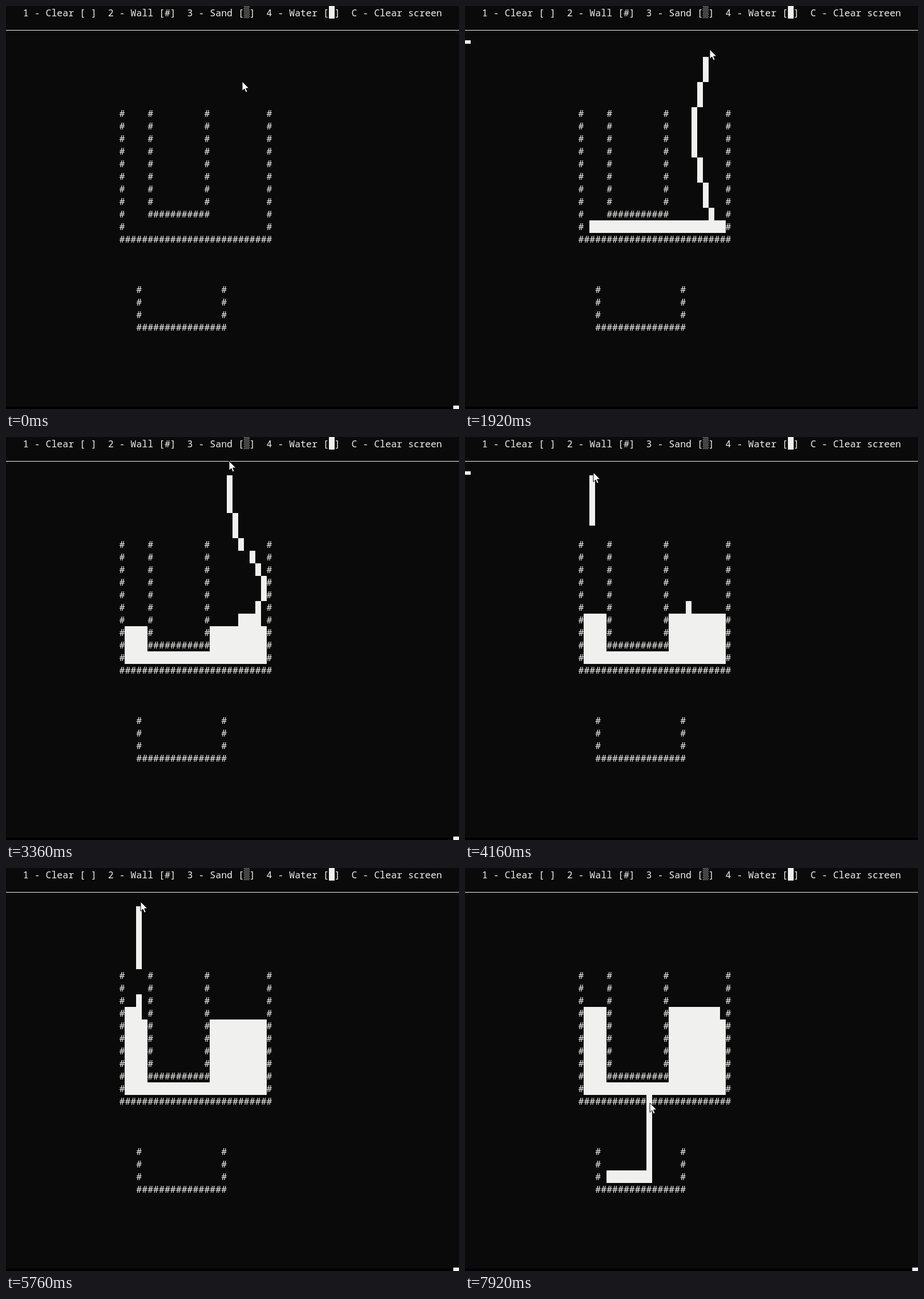
Write an HTML page with a canvas that moves like this. It is 794 by 705 pixels and loops after 8000 ms.

```html
<!DOCTYPE html>
<html lang="en">
<head>
<meta charset="utf-8">
<title>Falling water</title>
<style>
html, body { margin: 0; width: 100%; height: 100%; overflow: hidden; background: #0a0a0a; }
canvas { display: block; }
</style>
</head>
<body>
<canvas id="stage" width="794" height="705"></canvas>
<script>
const ctx = document.getElementById('stage').getContext('2d');
const LOOP = 8000, STEP = 80, TICK = 47;
const CW = 794 / 80, CH = 22;
const INK = '#f0f0ef', PAPER = '#0a0a0a';
const HOLE_COL = 32, HOLE_ROW = 18, HOLE_TICK = 155;
const HEADER = '   1 - Clear [ ]  2 - Wall [#]  3 - Sand [ ]  4 - Water [ ]  C - Clear screen';

// Turning points of the swaying hand: tick and position
const SWAY = [
  [0, 414], [8, 403], [10, 431], [11.5, 431], [19, 384], [23, 456], [34.5, 401],
  [43.5, 436], [51, 400], [63, 449.5], [68, 398], [71.5, 391], [85, 226],
  [98.5, 222], [104.5, 250.5], [109, 236.5], [131, 236], [139.5, 220], [154, 324]
];
const LIFT = [
  [0, 132], [8, 126], [11.5, 84], [43.5, 76], [71.5, 42], [74, 10], [76.5, 54],
  [85, 62], [139.5, 58], [154, 411]
];
const POURS = [[4, 71], [85, 115], [118, 140]];

// Cosine easing from one turning point to the next
function ease(keys, tick) {
  const i = keys.findIndex(k => k[0] > tick);
  if (i < 0) return keys[keys.length - 1][1];
  const [t0, a] = keys[i - 1], [t1, b] = keys[i];
  return a + (b - a) * (1 - Math.cos(Math.PI * (tick - t0) / (t1 - t0))) / 2;
}

const clamp = (v, lo, hi) => Math.min(hi, Math.max(lo, v));
const inTank = (c, r) => c > 20 && c < 46 && (r === 17 || c < 25 || c > 35);
const inTray = c => c > 23 && c < 38;

// Nearest free column in a row, trying the left side first
function freeCol(col, taken, allowed) {
  const ok = c => allowed(c) && !taken.some(w => w.col === c);
  for (let c = col; c > 20; c--) if (ok(c)) return c;
  for (let c = col; c < 46; c++) if (ok(c)) return c;
}

// Every water cell after the given number of ticks
function simulate(ticks) {
  const pool = [], tray = [];
  let drops = [], leaks = [], level = 17;
  for (let t = 0; t <= ticks; t++) {
    drops = drops.filter(d => {
      d.row++;
      if (d.row >= 8) d.col = d.col < 30 ? clamp(d.col, 21, 24) : clamp(d.col, 36, 45);
      if (d.row < level) return true;
      const taken = pool.filter(w => w.row === level);
      pool.push({ col: freeCol(d.col, taken, c => inTank(c, level)), row: level });
      if (taken.length + 1 === (level === 17 ? 25 : 14)) level--;
      return false;
    });
    leaks = leaks.filter(d => {
      if (++d.row < 24) return true;
      tray.push({ col: freeCol(d.col, tray, inTray), row: 24 });
      return false;
    });
    if (POURS.some(([a, b]) => t >= a && t <= b)) {
      const col = Math.floor(ease(SWAY, t) / CW);
      const row = Math.floor((ease(LIFT, t) - 1) / CH) + 1;
      drops.push({ col, row: Math.max(3, row) });
    }
    if (t >= HOLE_TICK) {
      pool.pop();
      leaks.push({ col: HOLE_COL, row: HOLE_ROW });
    }
  }
  return [...pool, ...tray, ...drops, ...leaks];
}

function text(str, col, row) {
  [...str].forEach((ch, i) => ctx.fillText(ch, (col + i) * CW, row * CH + 18));
}

function block({ col, row }) {
  const x = Math.round(col * CW);
  ctx.fillRect(x, row * CH + 1, Math.round((col + 1) * CW) - x, CH);
}

function drawHeader() {
  text(HEADER, 0, 0);
  ctx.fillRect(566, 0, 10, 22);
  ctx.fillRect(0, 42, 794, 1);
  for (let y = 0; y < 21; y += 2)
    for (let x = y / 2 % 2; x < 10; x += 2) ctx.fillRect(417 + x, y, 1, 1);
}

// A U-shaped vessel: two sides standing on a floor
function drawVessel(left, right, top, floor) {
  for (let r = top; r < floor; r++) {
    text('#', left, r);
    text('#', right, r);
  }
  text('#'.repeat(right - left + 1), left, floor);
}

function drawWalls(open) {
  drawVessel(20, 46, 8, HOLE_ROW);
  drawVessel(25, 35, 8, 16);
  drawVessel(23, 38, 22, 25);
  if (open) block({ col: HOLE_COL, row: HOLE_ROW });
}

const ARROW = new Path2D('M0 0V16.5L3.8 13L6.5 19.2L9.2 18L6.6 12H12Z');
function drawPointer(x, y) {
  ctx.save();
  ctx.translate(Math.round(x), Math.round(y));
  ctx.strokeStyle = '#000';
  ctx.fillStyle = '#fff';
  ctx.fill(ARROW);
  ctx.stroke(ARROW);
  ctx.restore();
}

function draw(now) {
  const step = Math.floor(now % LOOP / STEP);
  const tick = step * STEP / TICK;
  ctx.fillStyle = PAPER;
  ctx.fillRect(0, 0, 794, 705);
  ctx.fillStyle = '#000';
  ctx.fillRect(0, 701, 794, 4);
  ctx.fillStyle = INK;
  ctx.font = '16.54px "Noto Sans Mono", "DejaVu Sans Mono", monospace';
  drawHeader();
  drawWalls(tick >= HOLE_TICK);
  simulate(Math.floor(tick)).forEach(block);
  // The text cursor is sometimes caught at the start of a redraw
  if (step % 7 === 3) ctx.fillRect(0, 60, 10, 6);
  else ctx.fillRect(784, 699, 10, 6);
  drawPointer(ease(SWAY, tick), ease(LIFT, tick));
}

const start = performance.now();
function frame() {
  draw(performance.now() - start);
  requestAnimationFrame(frame);
}
frame();
</script>
</body>
</html>
```
